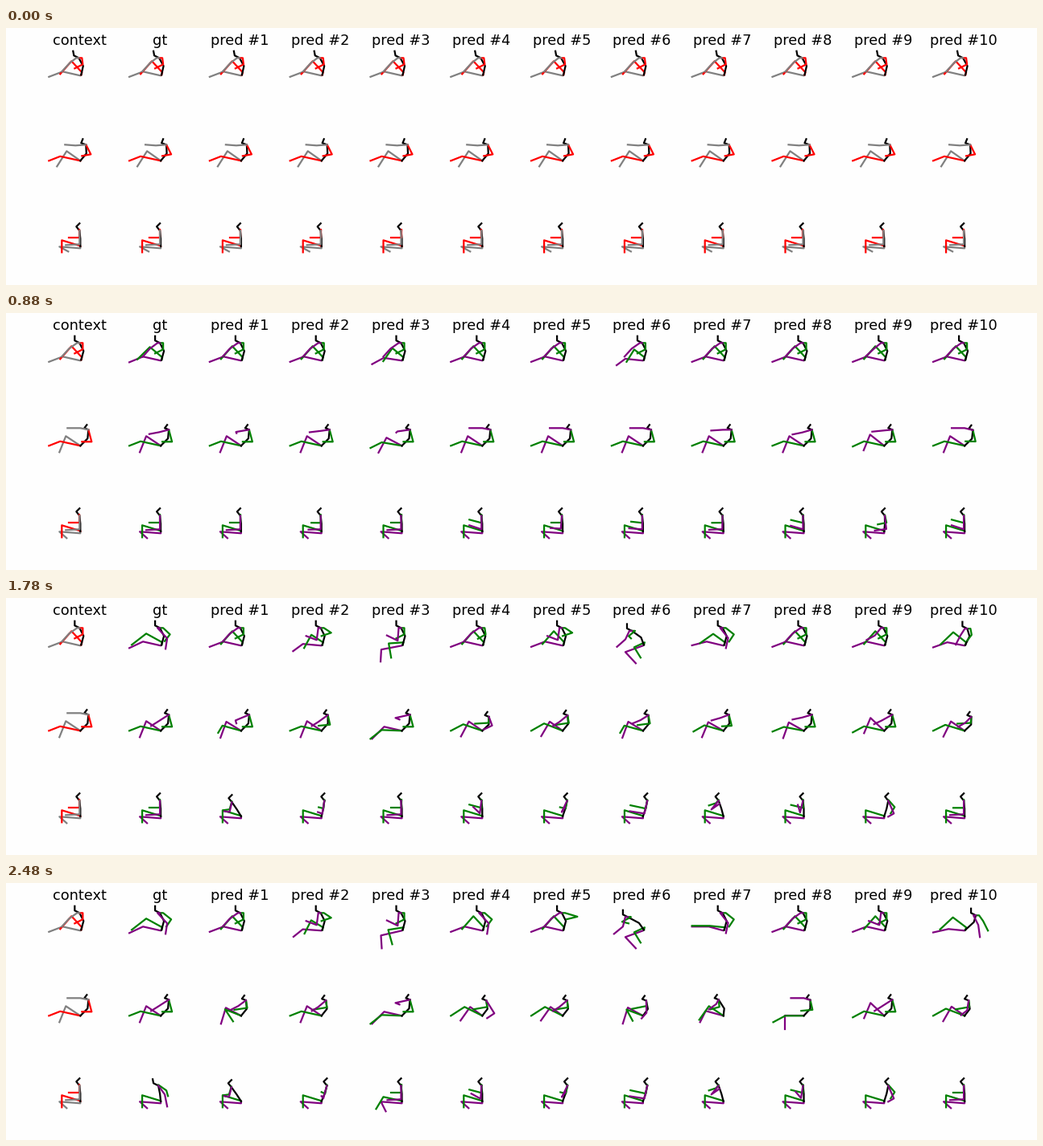
A matplotlib script that plays this animation: 1280x320 px, repeating every 2.5 s.

```python
import numpy as np
import matplotlib.pyplot as plt
from matplotlib.animation import FuncAnimation

W, H, STEP = 1280, 320, 99.8
FRAMES, SEEN, FPS = 125, 25, 50

# Joints: head, nose, neck, spine, root, then left/right (l, r) of
# s = shoulder, e = elbow, w = wrist, h = hip, k = knee, a = ankle.
CHAINS = [
    ("right", "root rh rk ra"),
    ("left", "root lh lk la"),
    ("mid", "root spine neck nose head"),
    ("left", "neck ls le lw"),
    ("right", "neck rs re rw"),
]
PAST = dict(left="red", right="gray", mid="black")
FUTURE = dict(left="green", right="purple", mid="black")
FOLLOW_NECK = dict(head=1, nose=1, ls=1, rs=1, spine=0.5)


def pose(**joints):
    return {name: np.array(p, float) for name, p in joints.items()}


def offsets(base, goal):
    """Shift of each joint from base to goal; the upper body follows the neck."""
    shift = {n: np.subtract(p, base[n]) for n, p in goal.items()}
    if "neck" in shift:
        for name, share in FOLLOW_NECK.items():
            shift.setdefault(name, share * shift["neck"])
    return shift


class Scene:
    """A pose, its opening, named gestures, and who makes which gesture when.

    Each plan entry is (gesture, amount, start second, end second).
    """

    def __init__(self, base, opening, gestures, plan):
        self.base, self.plan = base, plan
        self.opening = offsets(base, opening)
        self.gestures = {n: offsets(base, g) for n, g in gestures.items()}

    def at(self, col, f):
        joints = dict(self.base)
        parts = [(self.opening, max(0, 1 - f / (SEEN - 1)))]
        if col:
            parts += [(self.gestures[name], amount * ease((f / FPS - t0) / (t1 - t0)))
                      for name, amount, t0, t1 in self.plan.get(col, [])]
        for shift, weight in parts:
            for name, d in shift.items():
                joints[name] = joints[name] + weight * d
        return joints


def ease(u):
    u = min(max(u, 0), 1)
    return u * u * (3 - 2 * u)


recline = Scene(
    pose(head=(85, 28.5), nose=(85, 34), neck=(91, 37), spine=(96, 47), root=(93, 58),
         ls=(95, 37), le=(95, 45), lw=(85, 50), rs=(88, 37), re=(78, 44), rw=(69, 54),
         lh=(94, 55), lk=(81, 41), la=(67, 57), rh=(92, 59), rk=(70, 54), ra=(53, 60.5)),
    pose(head=(83, 28.5), neck=(90, 37), re=(79, 43)),
    dict(
        reach=pose(le=(104, 43), lw=(92, 47)),
        rest=pose(le=(105, 45), lw=(99, 54)),
        hang=pose(re=(100, 50), rw=(98, 63)),
        bend=pose(re=(86, 52), rw=(73, 47)),
        slide=pose(lk=(74, 44), la=(56, 58), ra=(53, 62)),
        sit=pose(lk=(75, 58), la=(80, 76), rk=(66, 65), ra=(67, 81)),
        crouch=pose(lk=(81, 61), la=(89, 74), rk=(70, 67), ra=(83, 81)),
        roll=pose(neck=(73, 42), le=(66, 48), lw=(74, 50), re=(67, 54), rw=(56, 63)),
        stretch=pose(lk=(75, 53), la=(53, 53), rk=(74, 54), ra=(53, 54)),
        tip=pose(neck=(106, 40), le=(115, 47), lw=(121, 59), re=(109, 52), rw=(111, 67), rk=(72, 57)),
    ),
    {
        1: [("slide", 1, .6, 1.3), ("rest", 1, 1.1, 2), ("hang", 1, .8, 1.7)],
        3: [("reach", 1, .9, 1.5), ("bend", 1, .9, 1.4), ("sit", .3, 1, 2)],
        4: [("sit", 1, .5, 2.1), ("bend", 1.1, 1, 1.6)],
        5: [("rest", .9, 1.6, 2.4), ("hang", 1, 2, 2.48)],
        6: [("reach", 1, .9, 1.5), ("bend", 1, .9, 1.5), ("reach", .7, 2, 2.48), ("bend", -1, 2, 2.48)],
        7: [("crouch", 1, .5, 1.8), ("roll", 1, 1, 2.2)],
        8: [("rest", 1, .9, 1.6), ("hang", .9, 1, 1.6), ("stretch", 1, 1.5, 2.3)],
        10: [("bend", .3, .6, 1.4), ("bend", .7, 2, 2.48)],
        11: [("slide", .5, 1, 2), ("tip", 1, 1.55, 2.2)],
    },
)

lounge = Scene(
    pose(head=(100, 139), nose=(97, 143), neck=(102, 145), spine=(101, 156), root=(92, 165),
         ls=(102, 145), le=(106, 160), lw=(94, 160), rs=(102, 145), re=(92, 143), rw=(76, 143),
         lh=(92, 165), lk=(67, 159.5), la=(53, 165), rh=(92, 165), rk=(74, 153), ra=(66, 173)),
    pose(head=(95, 138), nose=(93, 143), neck=(99, 145), le=(105, 157), lw=(94, 159),
         re=(86, 146), rw=(73, 145), rk=(75, 153), ra=(63, 172)),
    dict(
        fold=pose(re=(88, 154), rw=(80, 159)),
        tuck=pose(re=(84, 149), rw=(89, 151)),
        hang=pose(re=(107, 162), rw=(98, 168)),
        sink=pose(neck=(105, 150), le=(102, 157), lw=(86, 155)),
        back=pose(neck=(97, 146), le=(98, 154), lw=(81, 157)),
        flat=pose(lk=(67, 164), la=(53, 175), rk=(70, 160), ra=(55, 175)),
        knees=pose(lk=(70, 154), rk=(77, 154), ra=(65, 171)),
        swing=pose(lk=(72, 157), la=(82, 172), rk=(73, 155), ra=(67, 175)),
        drop=pose(lk=(69, 165), la=(54, 173), rk=(69, 165), ra=(69, 182)),
        lift=pose(rk=(75, 149), ra=(67, 168), la=(53, 167)),
        upright=pose(neck=(86, 145), le=(87, 154), lw=(76, 157), re=(85, 145), rw=(72, 149),
                     lk=(74, 153), la=(62, 170), rk=(70, 159), ra=(63, 173)),
    ),
    {
        1: [("fold", 1, .5, 1.3)],
        2: [("tuck", .8, .5, .9), ("tuck", -.8, 1.6, 2.2), ("fold", .9, 1.2, 2.3),
            ("swing", 1, 1.3, 2.48), ("back", .8, 2, 2.4)],
        3: [("fold", 1, .5, 1.5), ("back", .9, 1.2, 2.4)],
        4: [("tuck", 1, .5, 1.1), ("flat", 1, .5, 1.6)],
        5: [("sink", 1, .9, 1.3), ("sink", -1, 1.5, 2), ("back", 1, 1.5, 2),
            ("knees", 1, 1.4, 2.2), ("hang", 1, 1.2, 2)],
        6: [("fold", 1, 1.1, 1.7), ("back", .9, 1, 2), ("knees", 1, 1.3, 2.1)],
        7: [("fold", .8, 1.2, 1.6), ("hang", .5, 1.9, 2.4), ("swing", .9, 1.3, 2.4), ("back", 1.2, 1.4, 2.1)],
        8: [("fold", .5, .5, 1.4), ("upright", 1, 1.5, 2.48)],
        9: [("fold", .5, .5, .9), ("fold", -.5, 2, 2.48), ("drop", 1, 1.6, 2.4), ("back", .4, 2.1, 2.48)],
        10: [("fold", .4, .5, 1.1), ("fold", .6, 1.3, 2), ("lift", 1, .5, 1.3)],
        11: [("sink", 1, .8, 1.2), ("sink", -1, 1.5, 2), ("back", 1, 1.5, 2),
             ("fold", .7, 1.1, 1.6), ("knees", .6, 1.4, 2.1), ("hang", .4, 1.5, 2)],
    },
)

seat = Scene(
    pose(head=(91, 243), nose=(87, 247), neck=(91, 252), spine=(92, 262), root=(92, 271.5),
         ls=(91, 251), le=(91, 261), lw=(78, 261), rs=(91, 252), re=(91, 269), rw=(74, 270),
         lh=(92, 271), lk=(69, 264), la=(69, 279), rh=(92, 274), rk=(66, 272), ra=(75, 280)),
    pose(ra=(77, 278)),
    dict(
        hands=pose(lw=(92, 260), rw=(92, 265)),
        lift=pose(lw=(76, 257), rw=(76, 264)),
        fold=pose(re=(86, 266), rw=(86, 260)),
        forward=pose(neck=(80, 254), le=(77, 263), lw=(70, 264), re=(77, 266), rw=(71, 265)),
        lean=pose(neck=(98, 252), le=(96, 262), re=(94, 268)),
        chin=pose(neck=(86, 252), le=(83, 255), lw=(74, 258), re=(77, 263), rw=(87, 256)),
        out=pose(neck=(97, 252), le=(105, 260), lw=(100, 268), re=(104, 268), rw=(97, 272)),
        kick=pose(lk=(69, 266), la=(60, 281), ra=(72, 284)),
        slump=pose(head=(82, 244), nose=(83, 249), neck=(89, 252),
                   le=(99, 258), lw=(101, 265), re=(97, 263), rw=(100, 278)),
    ),
    {
        1: [("slump", 1, 2.05, 2.48)],
        2: [("forward", 1, 1, 1.9)],
        3: [("lean", 1.1, .9, 2.45), ("hands", 1, .5, 2.4)],
        4: [("kick", 1, 2.05, 2.48)],
        5: [("lift", 1, .5, .9), ("fold", .7, .9, 1.3), ("fold", -.5, 1.5, 2)],
        6: [("fold", .6, .7, 1.1), ("lean", 1, 1.1, 1.9), ("hands", .8, .9, 1.9)],
        7: [("lift", .8, .5, 1.3), ("lean", .9, .9, 1.8)],
        8: [("chin", 1, .8, 1.6)],
        9: [("lift", .9, .5, .9), ("fold", .9, 1, 1.5), ("fold", -.4, 1.6, 2)],
        10: [("out", 1, .5, 1.6)],
        11: [("lift", 1, .5, .9), ("lift", -1, 1.2, 1.8)],
    },
)

fig = plt.figure(figsize=(W / 100, H / 100), dpi=100, facecolor="#fefefe")
ax = fig.add_axes([0, 0, 1, 1])
ax.set(xlim=(0, W), ylim=(H, 0))
ax.axis("off")

titles = ["context", "gt"] + [f"pred #{i}" for i in range(1, 11)]
for col, title in enumerate(titles):
    ax.text(91 + STEP * col, 21.3, title, ha="center", va="baseline",
            fontsize=12.8, family="DejaVu Sans")

figures = [(scene, col, [(side, names.split(), ax.plot([], [], lw=1.6)[0]) for side, names in CHAINS])
           for scene in (recline, lounge, seat) for col in range(len(titles))]


def draw(f):
    for scene, col, limbs in figures:
        joints = scene.at(col, f)
        colors = PAST if f < SEEN or col == 0 else FUTURE
        for side, names, line in limbs:
            x, y = np.array([joints[n] for n in names]).T
            line.set_data(x + STEP * col + 0.3, y + 0.3)
            line.set_color(colors[side])
    return [line for *_, limbs in figures for *_, line in limbs]


anim = FuncAnimation(fig, draw, frames=FRAMES, interval=1000 / FPS, repeat=True, repeat_delay=0)
plt.show()
```
